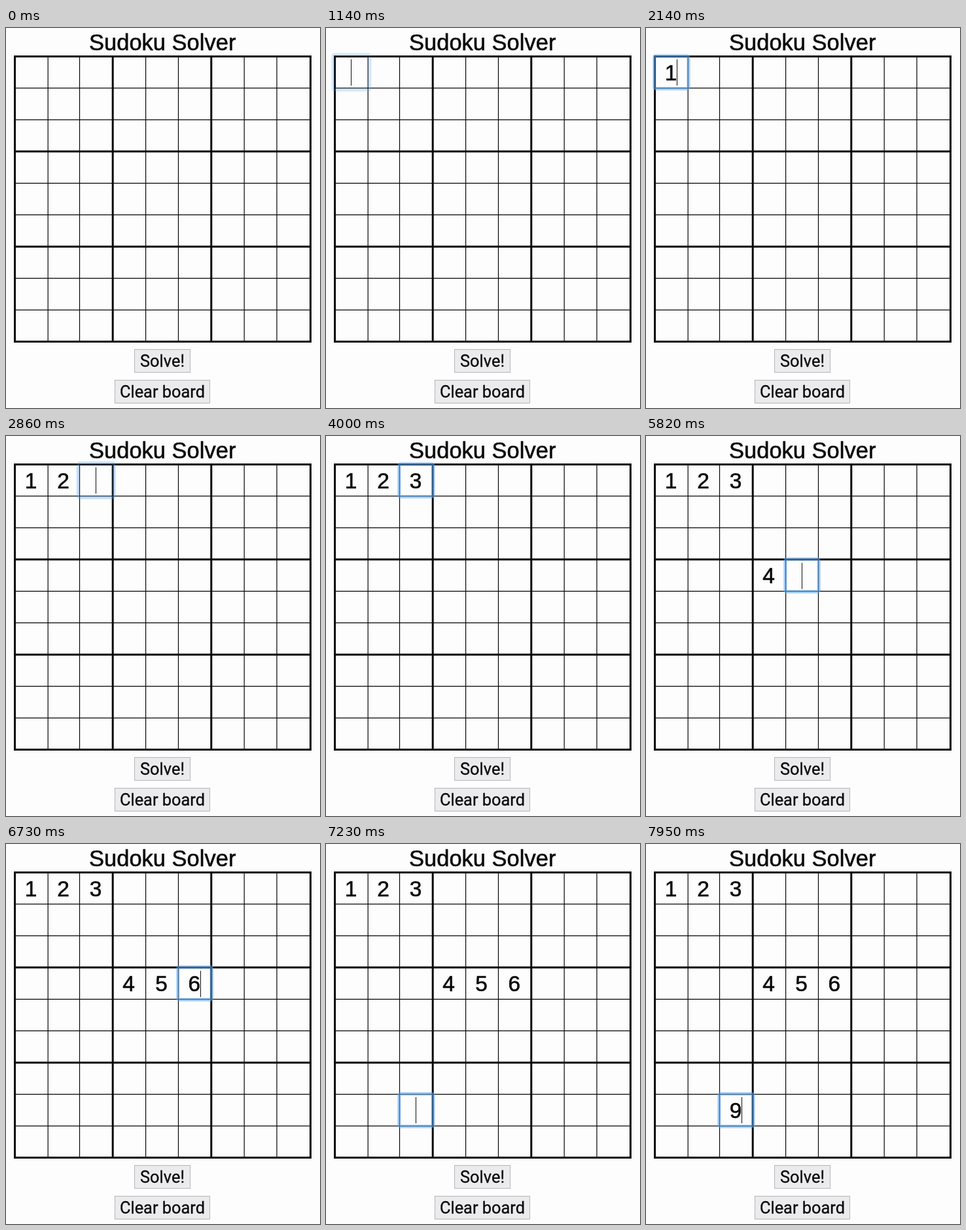
Write an HTML page that moves like this. It is 480 px wide and 581 px high and loops after 8000 ms.

```html
<!DOCTYPE html>
<html lang="en">
<head>
<meta charset="utf-8">
<title>Sudoku Solver</title>
<style>
  html, body { margin: 0; width: 100%; height: 100%; overflow: hidden; background: #fefdfe; }
  svg { display: block; width: 480px; height: 581px; }
  text {
    text-anchor: middle; fill: #0a0a0a; stroke: #0a0a0a; stroke-width: .6;
    font-family: "Liberation Sans", Arial, sans-serif;
  }
  .title { font-size: 34.5px; }
  .digit { font-size: 33.5px; }
  .button text { font: 25.4px Roboto, sans-serif; stroke-width: .3; }
  .button rect { fill: #ebeaec; stroke: #b5b5b7; }
  path { stroke: #060606; fill: none; }
  .thin { stroke-width: 1.2; }
  .thick { stroke-width: 3; stroke-linecap: square; }
  .ring rect { fill: none; stroke: #55a3f0; }
  .halo { stroke-width: 6; stroke-opacity: .3; }
  .core { stroke-width: 3.4; stroke-opacity: .45; }
</style>
</head>
<body>
<svg id="stage" viewBox="0 0 480 581">
  <text class="title" x="239.2" y="34">Sudoku Solver</text>
</svg>
<script>
const LOOP = 8000, CARET_ON = 450, CARET_PERIOD = 1000, RING_IN = 130;
const xs = [13.5, 64.2, 112.5, 163.2, 213.6, 263.5, 313.8, 364.2, 414, 465.5];
const ys = Array.from({ length: 10 }, (_, i) => 43.5 + i * 436 / 9);

// When each cell gains focus and when its digit is typed
const entries = [
  { row: 0, col: 0, digit: 1, focus: 1140, typed: 2140 },
  { row: 0, col: 1, digit: 2, focus: 2360, typed: 2600 },
  { row: 0, col: 2, digit: 3, focus: 2820, typed: 3230 },
  { row: 3, col: 3, digit: 4, focus: 4230, typed: 5140 },
  { row: 3, col: 4, digit: 5, focus: 5500, typed: 5900 },
  { row: 3, col: 5, digit: 6, focus: 6320, typed: 6560 },
  { row: 7, col: 2, digit: 9, focus: 6900, typed: 7560 },
];

const stage = document.getElementById('stage');

function add(tag, attrs, parent = stage) {
  const node = document.createElementNS('http://www.w3.org/2000/svg', tag);
  setAttrs(node, attrs);
  return parent.appendChild(node);
}

function setAttrs(node, attrs) {
  for (const key in attrs) node.setAttribute(key, attrs[key]);
}

function addButton(label, x, y, width) {
  const group = add('g', { class: 'button' });
  add('rect', { x, y, width, height: 35 }, group);
  add('text', { x: x + width / 2, y: y + 26.2 }, group).textContent = label;
}

function addLines(thick) {
  const keep = (_, i) => (i % 3 === 0) === thick;
  const d = xs.filter(keep).map(x => `M${x} ${ys[0]}V${ys[9]}`).join('') +
            ys.filter(keep).map(y => `M${xs[0]} ${y}H${xs[9]}`).join('');
  add('path', { d, class: thick ? 'thick' : 'thin' });
}

addLines(false);
addLines(true);
addButton('Solve!', 196.5, 491.5, 85);
addButton('Clear board', 166.5, 538.5, 145);

for (const entry of entries) {
  entry.x = (xs[entry.col] + xs[entry.col + 1]) / 2 - .5;
  entry.y = (ys[entry.row] + ys[entry.row + 1]) / 2 + .5;
  entry.node = add('text', { class: 'digit', x: entry.x - .4, y: entry.y + 11.3 });
  entry.node.textContent = entry.digit;
}

const ring = add('g', { class: 'ring' });
const ringRects = ['halo', 'core'].map(name => add('rect', { class: name, rx: 2 }, ring));
const caret = add('rect', { width: 1, height: 40, fill: '#111' });

function render(time) {
  const now = time % LOOP;
  for (const { node, typed } of entries) {
    node.setAttribute('visibility', now >= typed ? 'visible' : 'hidden');
  }

  const active = entries.filter(entry => now >= entry.focus).pop();
  ring.setAttribute('visibility', active ? 'visible' : 'hidden');
  caret.setAttribute('visibility', 'hidden');
  if (!active) return;

  const { row, col, x, y, focus, typed } = active;
  const settle = Math.min(1, (now - focus) / RING_IN);
  const outset = .7 + 2 * (1 - settle);
  ring.setAttribute('opacity', .4 + .6 * settle);
  for (const rect of ringRects) {
    setAttrs(rect, {
      x: xs[col] - outset,
      y: ys[row] - outset,
      width: xs[col + 1] - xs[col] + 2 * outset,
      height: ys[row + 1] - ys[row] + 2 * outset,
    });
  }

  const hasDigit = now >= typed;
  const sinceInput = now - (hasDigit ? typed : focus);
  if (sinceInput % CARET_PERIOD < CARET_ON) {
    setAttrs(caret, {
      x: Math.floor(x + (hasDigit ? 9.5 : .5)),
      y: Math.round(y - 20),
      visibility: 'visible',
    });
  }
}

const start = performance.now();
function tick() {
  render(performance.now() - start);
  requestAnimationFrame(tick);
}
tick();
</script>
</body>
</html>
```
